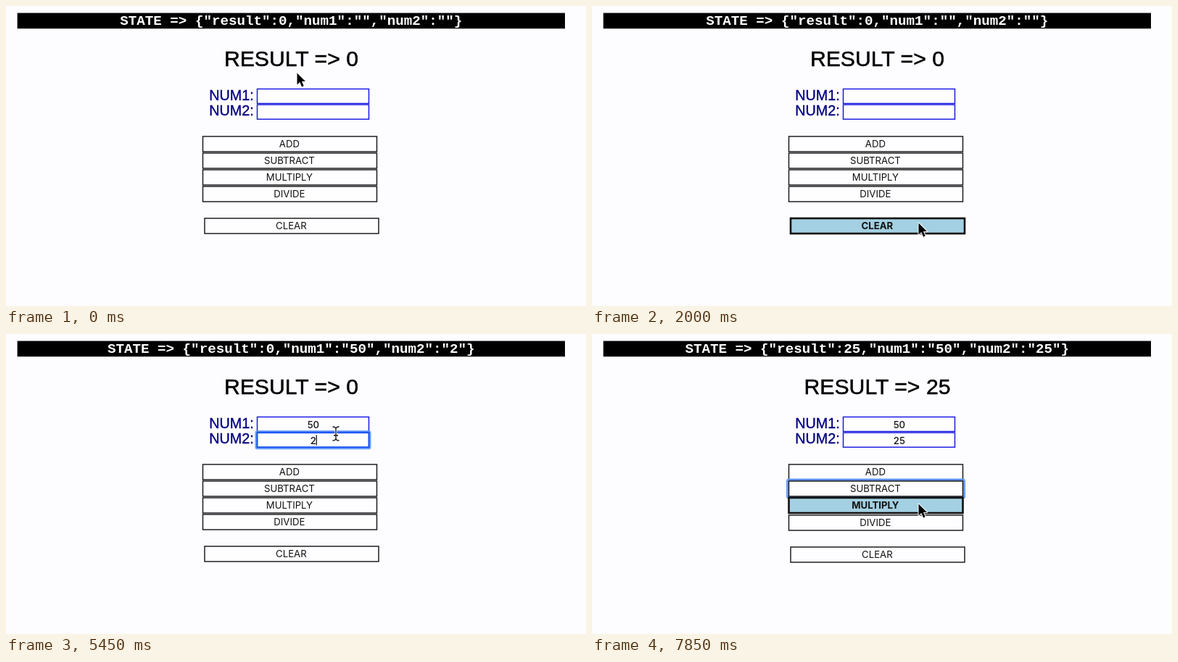
An HTML page for the animation above (8 s loop, 800 px wide and 414 px high).

```html
<!DOCTYPE html>
<html lang="en">
<head>
<meta charset="utf-8">
<title>Calculator state demo</title>
<style>
  html, body { margin: 0; width: 100%; height: 100%; overflow: hidden; background: #fdfcff; }
  svg { display: block; width: 100vw; height: 100vh; }
  text { text-anchor: middle; white-space: pre; }
  .state { font: bold 19.2px "Liberation Mono", "Courier New", monospace; fill: #fff; }
  .result { font: 30.2px "Liberation Sans", Arial, sans-serif; stroke: #000; stroke-width: .5; }
  .label { font: 19.8px "Liberation Sans", Arial, sans-serif; fill: #000080; stroke: #000080; stroke-width: .35; }
  .ui { font: 13.2px Inter, "Open Sans", sans-serif; fill: #111; }
  .value { font-weight: 500; }
  .bold { font-weight: 700; }
  .button { fill: #fefdff; stroke: #111; stroke-width: 1.4; }
  .hover { fill: #a3d0e2; stroke-width: 2.6; }
  .input { fill: #fefeff; stroke: #1010e0; stroke-width: 1.4; }
  .focused { stroke: #1450f5; stroke-width: 2; }
  .glow { fill: none; stroke: #5f96f6; stroke-width: 3.6; stroke-opacity: .9; }
  .caret { stroke: #000; stroke-width: 1.2; }
  .arrow { stroke: #fff; stroke-width: 2; paint-order: stroke; stroke-linejoin: round; }
  .halo { fill: none; stroke: #fff; stroke-width: 3; }
  .beam { fill: none; stroke: #111; stroke-width: 1.3; }
</style>
</head>
<body>
<svg id="stage" viewBox="0 0 800 414" preserveAspectRatio="none"></svg>
<script>
const LOOP = 8000, TICK = 50;
const stage = document.getElementById('stage');

const home = { x: 401, y: 92 };
const moves = [
  { from: 50, to: 550, x: 495, y: 78 },
  { from: 700, to: 1050, x: 488, y: 44 },
  { from: 1200, to: 1450, x: 488, y: 72 },
  { from: 1500, to: 2000, x: 450, y: 299 },
  { from: 2450, to: 2850, x: 446, y: 124 },
  { from: 4300, to: 4650, x: 455, y: 137 },
  { from: 5900, to: 6200, x: 450, y: 192 },
  { from: 6650, to: 7150, x: 450, y: 214 },
  { from: 7600, to: 7850, x: 450, y: 234 }
];
const hidden = { from: 3800, to: 4300 };

const inputs = [
  { name: 'NUM1', y: 114.5, text: '50', focusAt: 3100, typeAt: 3800, gap: 200 },
  { name: 'NUM2', y: 136.2, text: '25', focusAt: 4700, typeAt: 5150, gap: 450 }
];
const buttons = ['ADD', 'SUBTRACT', 'MULTIPLY', 'DIVIDE'].map((name, i) => ({ name, x: 271.5, y: 180 + 23 * i }));
buttons.push({ name: 'CLEAR', x: 274, y: 293 });
buttons[0].focusAt = 6400;
buttons[1].focusAt = 7300;

const operations = { ADD: (a, b) => a + b, SUBTRACT: (a, b) => a - b };
const BUTTON = { w: 240, h: 21 }, INPUT = { x: 346.5, w: 154, h: 20 };

const text = (cls, x, y, s) => `<text class="${cls}" x="${x}" y="${y}">${s}</text>`;
const rect = (cls, x, y, w, h, out = 0) =>
  `<rect class="${cls}" x="${x - out}" y="${y - out}" width="${w + 2 * out}" height="${h + 2 * out}" rx="${out}"/>`;
const inside = (p, x, y, w, h) => p.x >= x && p.x <= x + w && p.y >= y && p.y <= y + h;
const clamp = (v, max) => Math.min(Math.max(v, 0), max);

function pointerAt(t) {
  return moves.reduce((p, m) => {
    const k = clamp((t - m.from) / (m.to - m.from), 1), ease = k * k * (3 - 2 * k);
    return { x: p.x + (m.x - p.x) * ease, y: p.y + (m.y - p.y) * ease };
  }, home);
}

function typedAt({ text, typeAt, gap }, t) {
  return text.slice(0, clamp(Math.floor((t - typeAt) / gap) + 1, text.length));
}

function stateAt(t) {
  const [num1, num2] = inputs.map(input => typedAt(input, t));
  const focus = [...inputs, ...buttons].filter(c => c.focusAt <= t).at(-1)?.name;
  const result = operations[focus]?.(+num1, +num2) ?? 0;
  return { focus, form: { result, num1, num2 } };
}

function drawInput(input, state, t) {
  const { x, w, h } = INPUT, { name, y } = input;
  const value = state.form[name.toLowerCase()], focused = state.focus === name;
  const mid = x + w / 2 + 0.4;
  let out = text('label', 311, y + 15.2, name + ':');
  if (focused) out += rect('glow', x, y, w, h, 1.2);
  out += rect(focused ? 'input focused' : 'input', x, y, w, h) + text('ui value', mid, y + 15.3, value);

  const lastEdit = value ? input.typeAt + (value.length - 1) * input.gap : input.focusAt;
  if (focused && (t - lastEdit) % 1000 < 500) {
    out += `<path class="caret" d="M${mid + value.length * 4.15 + 0.2} ${y + 3.4}v14"/>`;
  }
  return out;
}

// A hovered button's thicker border pushes the buttons below it down
function drawButtons(pointer, focus) {
  const { w, h } = BUTTON;
  let shift = 0;
  return buttons.map(({ name, x, y }) => {
    const top = y + shift;
    const hover = pointer && inside(pointer, x, y + 0.5, w, h + 1);
    if (hover) shift = 1;
    return (focus === name ? rect('glow', x, top, w, h, 1.8) : '') +
      rect(hover ? 'button hover' : 'button', x, top, w, h) +
      text(hover ? 'ui bold' : 'ui', x + w / 2 - 0.6, top + 15, name);
  }).join('');
}

function drawPointer(p) {
  const at = `<g transform="translate(${p.x} ${p.y})">`;
  if (inputs.some(i => inside(p, INPUT.x, i.y, INPUT.w, INPUT.h))) {
    const d = 'M-4.5-9Q0-9 0-6Q0-9 4.5-9M0-7V8M-4.5 10Q0 10 0 7Q0 10 4.5 10M-3 3H3';
    return `${at}<path class="halo" d="${d}"/><path class="beam" d="${d}"/></g>`;
  }
  return `${at}<path class="arrow" d="M.5.5V16.5L4.3 13L7 19.4L9.7 18.2L7 12H12Z"/></g>`;
}

function render(t) {
  const state = stateAt(t);
  const pointer = t >= hidden.from && t < hidden.to ? null : pointerAt(t);
  stage.innerHTML =
    rect('', 15.6, 9.6, 755.4, 21.6) +
    text('state', 393.3, 25.6, 'STATE =&gt; ' + JSON.stringify(state.form)) +
    text('result', 393.5, 83.2, 'RESULT =&gt; ' + state.form.result) +
    inputs.map(input => drawInput(input, state, t)).join('') +
    drawButtons(pointer, state.focus) +
    (pointer ? drawPointer(pointer) : '');
}

let last = -1;
const start = performance.now();
function frame() {
  const t = Math.floor(((performance.now() - start) % LOOP) / TICK) * TICK;
  if (t !== last) render(last = t);
  requestAnimationFrame(frame);
}
frame();
</script>
</body>
</html>
```
